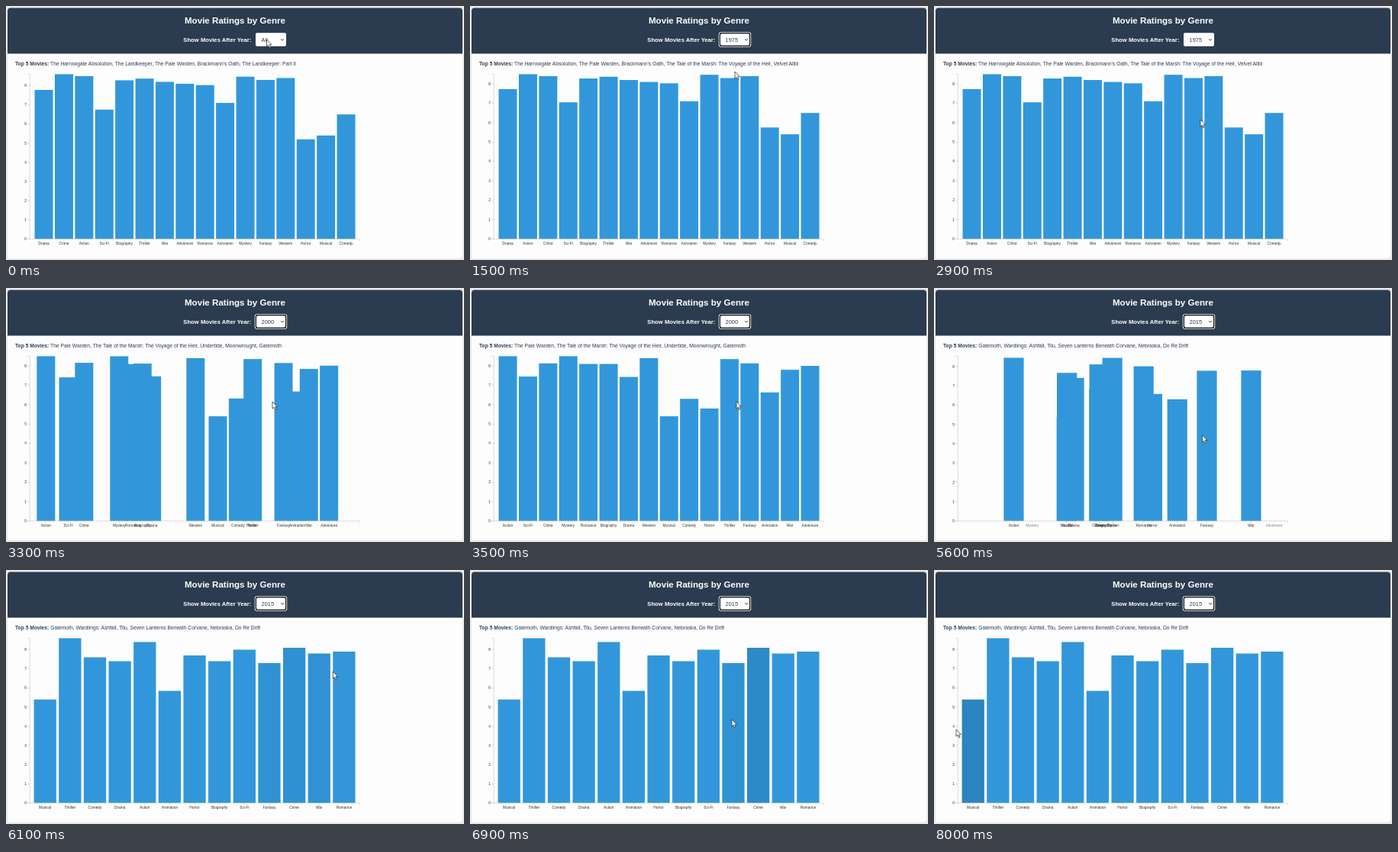
An HTML page that plays this animation: 600 by 333 pixels, repeating every 8100 ms.

```html
<!DOCTYPE html>
<html lang="en">
<head>
<meta charset="utf-8">
<title>Movie Ratings by Genre</title>
<style>
  html, body { margin: 0; width: 100%; height: 100%; overflow: hidden; background: #e9e9ea; }
  svg { display: block; width: 600px; height: 333px; font-family: Arial, "Liberation Sans", sans-serif; }
  .axis { font-size: 4.8px; fill: #333; }
  .line { fill: none; stroke: #bbb; stroke-width: .5; }
</style>
</head>
<body>
<svg viewBox="0 0 600 333">
  <rect x="2" y="3" width="596" height="329" rx="4" fill="#dcdcde"/>
  <rect x="2" y="2.5" width="596" height="328.7" rx="4" fill="#fdfdfe"/>
  <path d="M2 62.5V6.5a4 4 0 0 1 4-4H594a4 4 0 0 1 4 4V62.5Z" fill="#2b3c50"/>
  <g fill="#fff" font-weight="bold">
    <text x="300" y="22.8" font-size="11.6" text-anchor="middle">Movie Ratings by Genre</text>
    <text x="232.3" y="46.6" font-size="7.68">Show Movies After Year:</text>
  </g>
  <g id="ring">
    <rect x="325.8" y="34.2" width="42.4" height="19.6" rx="2.8" fill="#fff"/>
    <rect x="326.7" y="35.1" width="40.6" height="17.8" rx="2.2" fill="#101010"/>
  </g>
  <rect id="box" fill="#fff" rx="1.8"/>
  <text id="year" x="334.6" y="46.9" font-size="7.4" fill="#2c3e50"></text>
  <path d="M360.2 43.3l1.9 1.9 1.9-1.9" fill="none" stroke="#222" stroke-width=".9"/>
  <text x="12" y="78.3" font-size="6.72" fill="#2c3e50"><tspan font-weight="bold">Top 5 Movies:</tspan> <tspan id="top"></tspan></text>
  <g id="chart"></g>
  <path id="cursor" d="M0 0V9.2L2.1 7.3 3.6 10.7 5.1 10 3.7 6.7H6.5Z" fill="#fff" stroke="#222" stroke-width=".7" stroke-linejoin="round"/>
</svg>
<script>
const LOOP = 8100, FADE = 250, MOVE = 500;
const SCALE = .48, LEFT = 31.3, BASE = 305.4, WIDTH = 432, HEIGHT = 216;

const views = [
  { start: 0, year: "All",
    top: "The Harrowgate Absolution, The Landkeeper, The Pale Warden, Brackmann's Oath, The Landkeeper: Part II",
    data: "Drama 7.78,Crime 8.6,Action 8.5,Sci-Fi 6.75,Biography 8.28,Thriller 8.37,War 8.2,Adventure 8.1,Romance 8.03,Animation 7.1,Mystery 8.47,Fantasy 8.3,Western 8.4,Horror 5.2,Musical 5.4,Comedy 6.5" },
  { start: 950, year: "1975",
    top: "The Harrowgate Absolution, The Pale Warden, Brackmann's Oath, The Tale of the Marsh: The Voyage of the Heir, Velvet Alibi",
    data: "Drama 7.73,Action 8.5,Crime 8.4,Sci-Fi 7.05,Biography 8.28,Thriller 8.37,War 8.2,Adventure 8.1,Romance 8.03,Animation 7.1,Mystery 8.47,Fantasy 8.3,Western 8.4,Horror 5.75,Musical 5.4,Comedy 6.5" },
  { start: 2950, year: "2000",
    top: "The Pale Warden, The Tale of the Marsh: The Voyage of the Heir, Undertide, Moonwrought, Gatemoth",
    data: "Action 8.5,Sci-Fi 7.45,Crime 8.13,Mystery 8.5,Romance 8.1,Biography 8.1,Drama 7.43,Western 8.4,Musical 5.4,Comedy 6.3,Horror 5.8,Thriller 8.35,Fantasy 8.13,Animation 6.63,War 7.8,Adventure 8" },
  { start: 5366, year: "2015",
    top: "Gatemoth, Wardlings: Ashfall, Tilu, Seven Lanterns Beneath Corvane, Nebraska, Do Re Drift",
    data: "Musical 5.4,Thriller 8.6,Comedy 7.6,Drama 7.4,Action 8.4,Animation 5.85,Horror 7.7,Biography 7.4,Sci-Fi 8,Fantasy 7.3,Crime 8.1,War 7.8,Romance 7.9" }
];

// Rounded band scale with 0.1 padding
for (const v of views) {
  const rows = v.data.split(",").map(s => s.split(" "));
  const n = rows.length, full = WIDTH / SCALE;
  const step = Math.floor(full / (n + .1));
  const pad = Math.round((full - step * (n - .1)) / 2);
  v.unit = HEIGHT / Math.max(...rows.map(r => +r[1]));
  v.bars = new Map(rows.map(([name, value], i) => [name, {
    x: LEFT + (pad + i * step) * SCALE,
    w: Math.round(step * .9) * SCALE,
    h: value * v.unit
  }]));
}

// Pointer stops: time, x, y
const stops = [
  [0, 341.5, 44], [450, 341.5, 44], [800, 347, 86], [1700, 347, 86],
  [2150, 344, 44], [2350, 344, 44], [2700, 349, 149], [3550, 349, 149],
  [3950, 410, 185], [4400, 130, 190], [4750, 346, 44], [4950, 346, 44],
  [5250, 351.5, 193], [5900, 351.5, 193], [6300, 504, 74], [6480, 504, 76],
  [6680, 385, 90], [6820, 376, 180], [6900, 343, 196], [7600, 56, 206],
  [7880, 50, 208], [8000, 29, 209], [8100, 29, 209]
];

const $ = id => document.getElementById(id);
const mix = (a, b, p) => a + (b - a) * p;
const cubic = p => p < .5 ? 4 * p ** 3 : 1 - 4 * (1 - p) ** 3;
const between = (t, a, b) => t >= a && t < b;

function pointer(t) {
  const i = Math.max(1, stops.findIndex(s => s[0] > t));
  const [a, b] = [stops[i - 1], stops[i]];
  let p = (t - a[0]) / (b[0] - a[0]);
  p = p * p * (3 - 2 * p);
  return [mix(a[1], b[1], p), mix(a[2], b[2], p)];
}

// Hover shade: share of the last FADE ms spent over the bar
function shade(bar, t) {
  let hits = 0;
  for (let k = 0; k < 25; k++) {
    const s = t - k * FADE / 25;
    if (!between(s, 3560, 4750) && s < 5910) continue;
    const [x, y] = pointer(s);
    if (between(x, bar.x, bar.x + bar.w) && between(y, BASE - bar.h, BASE)) hits++;
  }
  return hits / 25;
}

const label = (name, x, opacity = 1) =>
  `<g opacity="${opacity}"><path class="line" d="M${x} ${BASE}v2.9"/>` +
  `<text x="${x}" y="312.7" text-anchor="middle">${name}</text></g>`;

function chart(t, view, prev) {
  const p = cubic(Math.min(1, (t - view.start) / MOVE));
  const right = LEFT + WIDTH, top = BASE - HEIGHT;
  let bars = "", axis = "";
  for (const [name, to] of view.bars) {
    const from = prev.bars.get(name) || to;
    const bar = { x: mix(from.x, to.x, p), w: mix(from.w, to.w, p), h: mix(from.h, to.h, p) };
    const s = shade(bar, t);
    const fill = `rgb(${mix(50, 41, s)},${mix(151, 128, s)},${mix(218, 185, s)})`;
    bars += `<rect x="${bar.x}" y="${BASE - bar.h}" width="${bar.w}" height="${bar.h}" fill="${fill}"/>`;
    axis += label(name, bar.x + bar.w / 2);
  }
  if (p < 1)
    for (const [name, b] of prev.bars)
      if (!view.bars.has(name)) axis += label(name, b.x + b.w / 2, 1 - p);
  for (let i = 0; i < 9; i++) {
    const y = BASE - i * mix(prev.unit, view.unit, p);
    axis += `<path class="line" d="M${LEFT} ${y}h-2.9"/><text x="27" y="${y + 1.7}" text-anchor="end">${i}</text>`;
  }
  axis += `<path class="line" d="M${LEFT - 2.9} ${top}h2.9V${BASE}h-2.9M${LEFT} ${BASE}H${right}v2.9"/>`;
  return `${bars}<g class="axis">${axis}</g>`;
}

function draw(now) {
  const t = now % LOOP;
  const index = views.findLastIndex(v => t >= v.start);
  const view = views[index];
  const focus = between(t, 950, 2300) || between(t, 2950, 4900) || t >= 5366;
  const inset = focus ? 1 : 0;

  $("ring").style.display = focus ? "" : "none";
  for (const [key, value] of Object.entries({
    x: 327 + inset, y: 35.3 + inset, width: 40 - 2 * inset, height: 17.4 - 2 * inset
  })) $("box").setAttribute(key, value);
  $("year").textContent = view.year;
  $("top").textContent = view.top;
  $("chart").innerHTML = chart(t, view, views[Math.max(0, index - 1)]);
  $("cursor").setAttribute("transform", `translate(${pointer(t)})`);
}

const begin = performance.now();
function tick() {
  draw(performance.now() - begin);
  requestAnimationFrame(tick);
}
tick();
</script>
</body>
</html>
```
